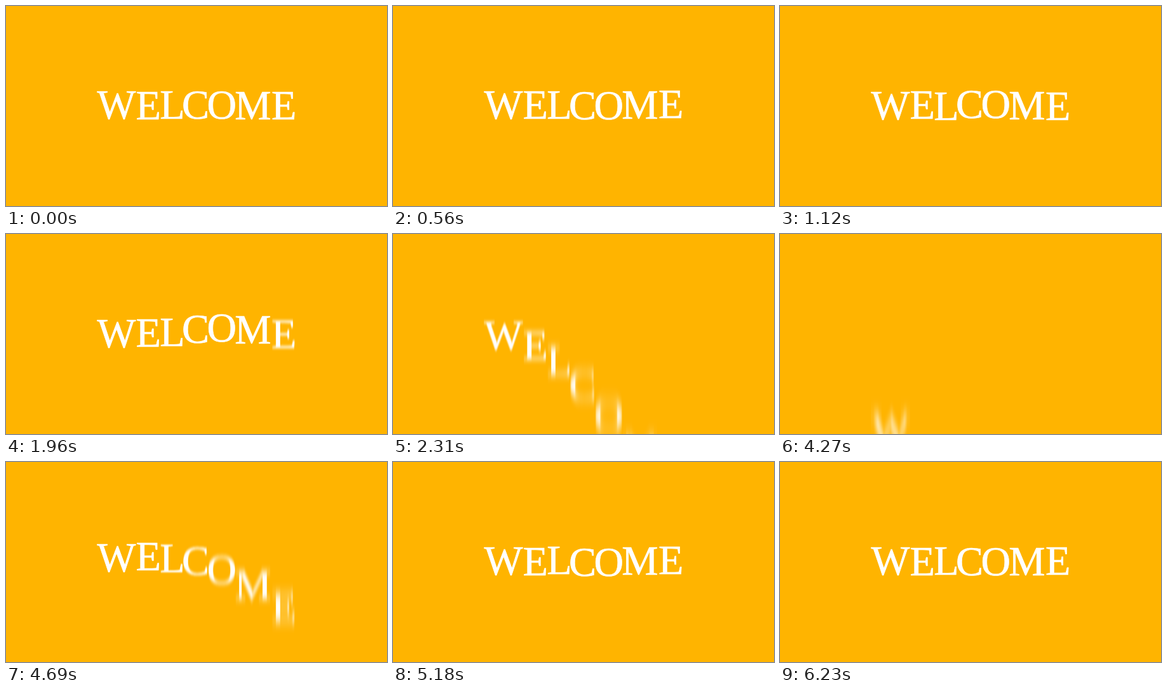
These frames come from a looping animation (600x314 px, 6.3 s). An HTML page:

```html
<!DOCTYPE html>
<html lang="en">
<head>
<meta charset="utf-8">
<title>Welcome</title>
<style>
  html, body { margin: 0; width: 100%; height: 100%; overflow: hidden; background: #ffb400; }
  svg { display: block; width: 100vw; height: 100vh; }
  text {
    font: 64.5px "Liberation Serif", serif;
    fill: #fff; stroke: #fff; stroke-width: 0.7px;
    text-anchor: middle;
  }
</style>
</head>
<body>
<svg id="stage" viewBox="0 0 600 314"></svg>
<script>
const LOOP = 6300, STEP = 70;
const BASELINE = 177.4, DROP = 200;
const MOVE = 600, STAGGER = 55;
const EXIT = 1660, ENTER = 4232;
const BOB = 1.3, BOB_PERIOD = 900;
const SHUTTER = 12;

// glyph, centre x, bob phase in degrees, bob strength
const LETTERS = [
  ["W", 174, 0, 0.2],
  ["E", 224.3, 100, 0.4],
  ["L", 262, 0, 1],
  ["C", 298.4, 180, 1],
  ["O", 339.7, 180, 0.9],
  ["M", 388.9, 60, 0.4],
  ["E", 437.6, 10, 0.9]
];

const stage = document.getElementById("stage");

function add(parent, tag, attrs) {
  const node = document.createElementNS("http://www.w3.org/2000/svg", tag);
  for (const key in attrs) node.setAttribute(key, attrs[key]);
  return parent.appendChild(node);
}

const parts = LETTERS.map(([glyph, x, phase, strength], i) => {
  const filter = add(stage, "filter", {
    id: "blur" + i, filterUnits: "userSpaceOnUse",
    x: -80, y: -120, width: 160, height: 200,
    "color-interpolation-filters": "sRGB"
  });
  const blur = add(filter, "feGaussianBlur", { stdDeviation: "0 0" });
  const node = add(stage, "text", {});
  node.textContent = glyph;
  return { node, blur, x, phase, strength };
});

// How far a letter has fallen: 0 at rest, 1 below the stage.
function fallen(t, i) {
  const out = (t - EXIT - (LETTERS.length - 1 - i) * STAGGER) / MOVE;
  const back = 1 - (t - ENTER - i * STAGGER) / MOVE;
  return Math.max(0, Math.min(1, out, back));
}

function draw(t) {
  parts.forEach((p, i) => {
    const u = fallen(t, i);
    const gone = u >= 1;
    p.node.setAttribute("visibility", gone ? "hidden" : "visible");
    if (gone) return;

    // Back easing: a small lift before the fall.
    const fall = DROP * (2 * u ** 3 - u ** 2);
    const speed = Math.abs(DROP * (6 * u ** 2 - 2 * u) / MOVE);
    const angle = 2 * Math.PI * t / BOB_PERIOD + p.phase * Math.PI / 180;
    const y = BASELINE + fall + BOB * p.strength * Math.sin(angle);
    const sigma = speed * SHUTTER;

    p.node.setAttribute("transform", `translate(${p.x} ${y.toFixed(2)})`);
    p.blur.setAttribute("stdDeviation", `0 ${sigma.toFixed(2)}`);
    if (sigma > 0.3) p.node.setAttribute("filter", `url(#blur${i})`);
    else p.node.removeAttribute("filter");
  });
}

const start = performance.now();
function tick() {
  const t = (performance.now() - start) % LOOP;
  draw(Math.floor(t / STEP) * STEP);
  requestAnimationFrame(tick);
}
tick();
</script>
</body>
</html>
```
